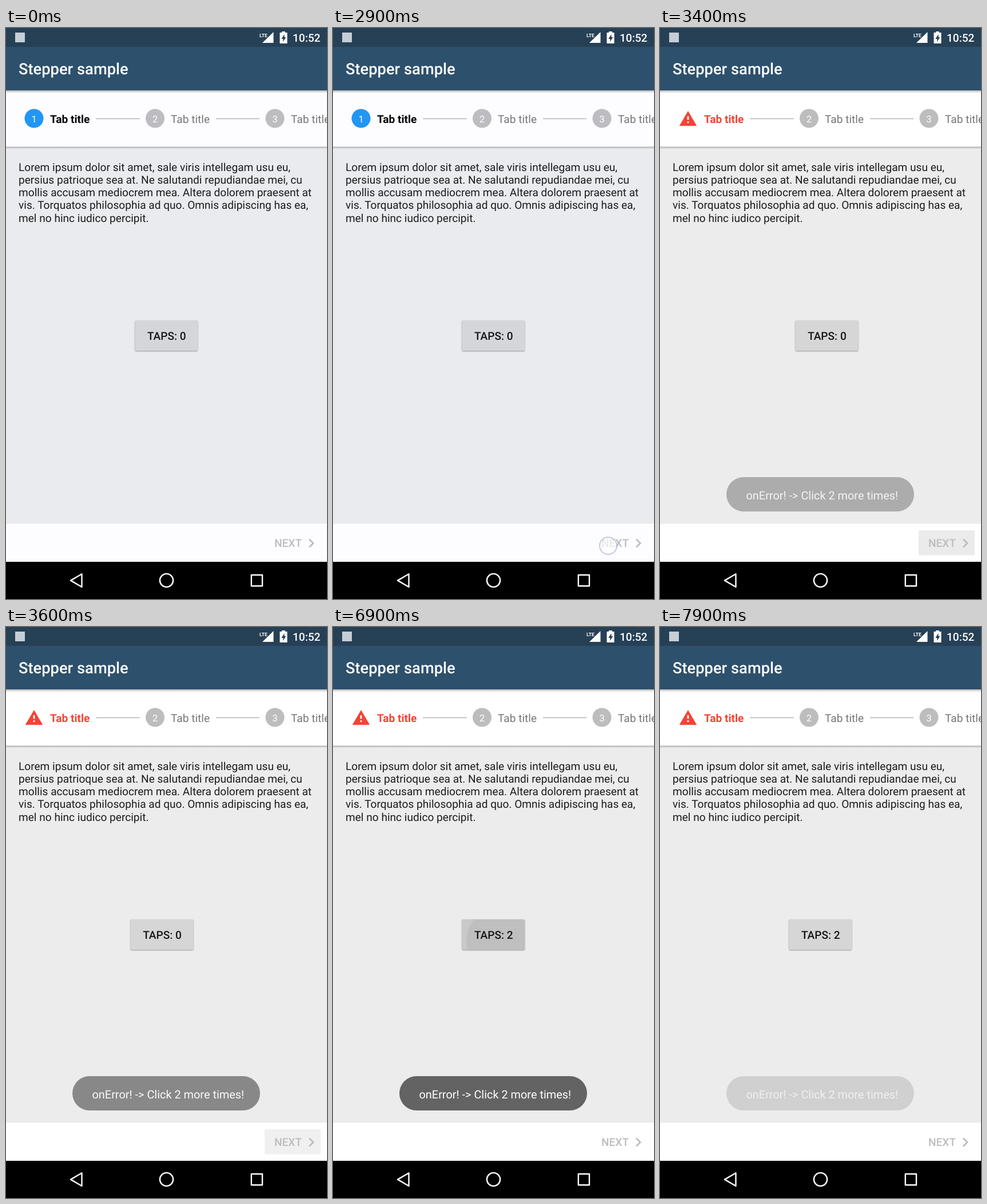
Write an HTML page that moves like this. It is 561 px wide and 998 px high and loops after 8000 ms.

```html
<!DOCTYPE html>
<html lang="en">
<head>
<meta charset="utf-8">
<title>Stepper sample</title>
<style>
  html, body { margin: 0; width: 100%; height: 100%; overflow: hidden; background: #000; }
  svg { display: block; width: 561px; height: 998px; font: 19.1px Roboto, sans-serif; text-rendering: geometricPrecision;
    --page: #eaebef; --bar: #fdfdff; --off: #bcbcc1; --btn: #d5d6da; }
  svg.error { --page: #ececec; --bar: #fff; --off: #bdbdbd; --btn: #d6d6d6; }
  .page { fill: var(--page); }
  .bar { fill: var(--bar); }
  .off { fill: var(--off); }
  .btn { fill: var(--btn); filter: drop-shadow(0 1px 1.2px rgba(0, 0, 0, .38)); }
  .medium { font-weight: 500; }
  .bold { font-weight: 700; }
  .grey { fill: #757575; }
  .num { font-size: 16.4px; fill: #fff; text-anchor: middle; }
  .white { fill: #fff; }
  .line { fill: none; stroke: #fff; stroke-width: 2.4; stroke-linejoin: round; }
</style>
</head>
<body>
<svg id="stage" viewBox="0 0 561 998">
  <defs>
    <linearGradient id="fade" x2="0" y2="1">
      <stop stop-opacity=".27"/><stop offset="1" stop-opacity="0"/>
    </linearGradient>
    <clipPath id="tapClip"><rect x="225.5" y="511" width="109.5" height="53" rx="2"/></clipPath>
    <clipPath id="nextClip"><rect x="452" y="878" width="98" height="43.5" rx="2"/></clipPath>
  </defs>

  <rect class="page" width="561" height="998"/>
  <rect class="bar" y="109" width="561" height="98.5"/>
  <rect y="207.5" width="561" height="4" fill="url(#fade)"/>
  <rect y="109" width="561" height="5" fill="url(#fade)"/>
  <rect y="33" width="561" height="76" fill="#2d506c"/>
  <rect width="561" height="33" fill="#264056"/>

  <!-- status bar -->
  <rect x="16" y="8" width="17" height="17" fill="#c5ced6"/>
  <text class="white bold" x="443" y="15.5" font-size="8.5">LTE</text>
  <path class="white" d="M467.500 7V26H448z"/>
  <path class="white" d="M482 6h6v2h3.500v19h-13V8h3.500z"/>
  <path fill="#264056" d="M486.500 11l-5.200 8h3v5l5-8h-2.800z"/>
  <text class="white medium" x="501" y="24">10:52</text>
  <text class="white medium" x="22" y="81.300" font-size="27.300">Stepper sample</text>

  <!-- steps -->
  <g id="first">
    <circle cx="49" cy="158" r="16.500" fill="#2196f3"/>
    <text class="num" x="49" y="164.500">1</text>
  </g>
  <g id="warning">
    <path fill="#f44336" d="M49 145l15.200 26H33.800z"/>
    <path class="white" d="M47.600 154.300h2.800v6.200h-2.800zM47.600 163.300h2.800v2.800h-2.800z"/>
  </g>
  <text id="firstTitle" class="bold" x="77" y="166">Tab title</text>
  <path d="M157 158.500H234M367 158.500H443" stroke="#b4b4b4" stroke-width="1.400"/>
  <circle class="off" cx="260.500" cy="158" r="16.500"/>
  <text class="num" x="260.500" y="164.500">2</text>
  <text class="grey" x="288" y="166">Tab title</text>
  <circle class="off" cx="470" cy="158" r="16.500"/>
  <text class="num" x="470" y="164.500">3</text>
  <text class="grey" x="498" y="166">Tab title</text>

  <g fill="#1c1c1c">
    <text x="22" y="249.700">Lorem ipsum dolor sit amet, sale viris intellegam usu eu,</text>
    <text x="22" y="271.900">persius patrioque sea at. Ne salutandi repudiandae mei, cu</text>
    <text x="22" y="294.100">mollis accusam mediocrem mea. Altera dolorem praesent at</text>
    <text x="22" y="316.300">vis. Torquatos philosophia ad quo. Omnis adipiscing has ea,</text>
    <text x="22" y="338.500">mel no hinc iudico percipit.</text>
  </g>

  <g id="button">
    <rect class="btn" x="225.500" y="511" width="109.500" height="53" rx="2"/>
    <g id="tapInk" clip-path="url(#tapClip)">
      <rect x="225" y="511" width="111" height="53" opacity=".06"/>
      <circle cx="291" cy="548" opacity=".05"/>
    </g>
    <text id="taps" class="medium" x="247" y="545" fill="#151515"></text>
  </g>

  <g id="toast">
    <rect x="116" y="785" width="328" height="60" rx="30" fill="#636363"/>
    <text class="white" x="150.500" y="823.500" font-size="19.900">onError! -&gt; Click 2 more times!</text>
  </g>

  <!-- bottom bar -->
  <rect class="bar" y="866.500" width="561" height="67"/>
  <g id="nextInk" clip-path="url(#nextClip)">
    <rect x="452" y="878" width="98" height="44" opacity=".07"/>
    <circle cx="481" cy="905" opacity=".03"/>
  </g>
  <text class="medium off" x="469" y="907.300">NEXT</text>
  <path d="M530 893.500l7 7l-7 7" fill="none" style="stroke: var(--off)" stroke-width="2.800"/>
  <rect y="933" width="561" height="65"/>
  <path class="line" d="M132.500 954.300V977L113 965.600z"/>
  <circle class="line" cx="280.500" cy="965.500" r="11.600"/>
  <rect class="line" x="428.800" y="956" width="19.200" height="19.200"/>

  <circle id="touch" r="15" fill="#fff" fill-opacity=".65" stroke="#98a5c4" stroke-opacity=".6" stroke-width="2"/>
</svg>
<script>
  const $ = id => document.getElementById(id);
  const clamp = (v, lo = 0, hi = 1) => Math.min(hi, Math.max(lo, v));
  const show = (id, a) => $(id).setAttribute('opacity', a);

  const LOOP = 8000, ERROR = 3084, SHAKE = 1000;
  const touches = [
    { at: 2900, x: 481, y: 905 },
    { at: 5700, x: 291, y: 548 },
    { at: 6400, x: 291, y: 548 }
  ];

  // linear interpolation through [time, value] points
  function track(t, points) {
    let [t0, v0] = points[0];
    for (const [t1, v1] of points) {
      if (t < t1) return v0 + (v1 - v0) * clamp((t - t0) / (t1 - t0));
      t0 = t1; v0 = v1;
    }
    return v0;
  }

  function ink(id, opacity, radius) {
    show(id, opacity);
    $(id).lastElementChild.setAttribute('r', Math.max(0, radius));
  }

  function draw(t) {
    const error = t >= ERROR;
    $('stage').setAttribute('class', error ? 'error' : '');
    show('first', error ? 0 : 1);
    show('warning', error ? 1 : 0);
    $('firstTitle').setAttribute('fill', error ? '#f44336' : '#000');

    const u = (t - ERROR) / SHAKE;
    const dx = u > 0 && u < 1 ? 11.4 * Math.sin(14 * Math.PI * u) : 0;
    $('button').setAttribute('transform', `translate(${dx} 0)`);
    $('taps').textContent = 'TAPS: ' + ((t >= 5900) + (t >= 6600));

    show('toast', track(t, [[3070, 0], [3200, .2], [3600, .72], [3700, 1], [7200, 1], [7900, .2], [8000, .1]]));

    const last = touches.filter(p => t >= p.at).pop();
    const age = last ? t - last.at : 1e4;
    show('touch', clamp((450 - age) / 250));
    if (last) $('touch').setAttribute('transform', `translate(${last.x} ${last.y})`);

    const next = t - touches[0].at;
    ink('nextInk', next < 800 ? track(next, [[20, 0], [100, 1], [300, 1], [700, .62]]) : 0, (next - 25) * .24);
    const tapping = t >= touches[1].at && age < 900;
    ink('tapInk', tapping ? clamp((age - 20) / 80) : 0, Math.min(58, (age - 25) * .122));
  }

  function tick() {
    draw(performance.now() % LOOP);
    requestAnimationFrame(tick);
  }
  tick();
</script>
</body>
</html>
```
